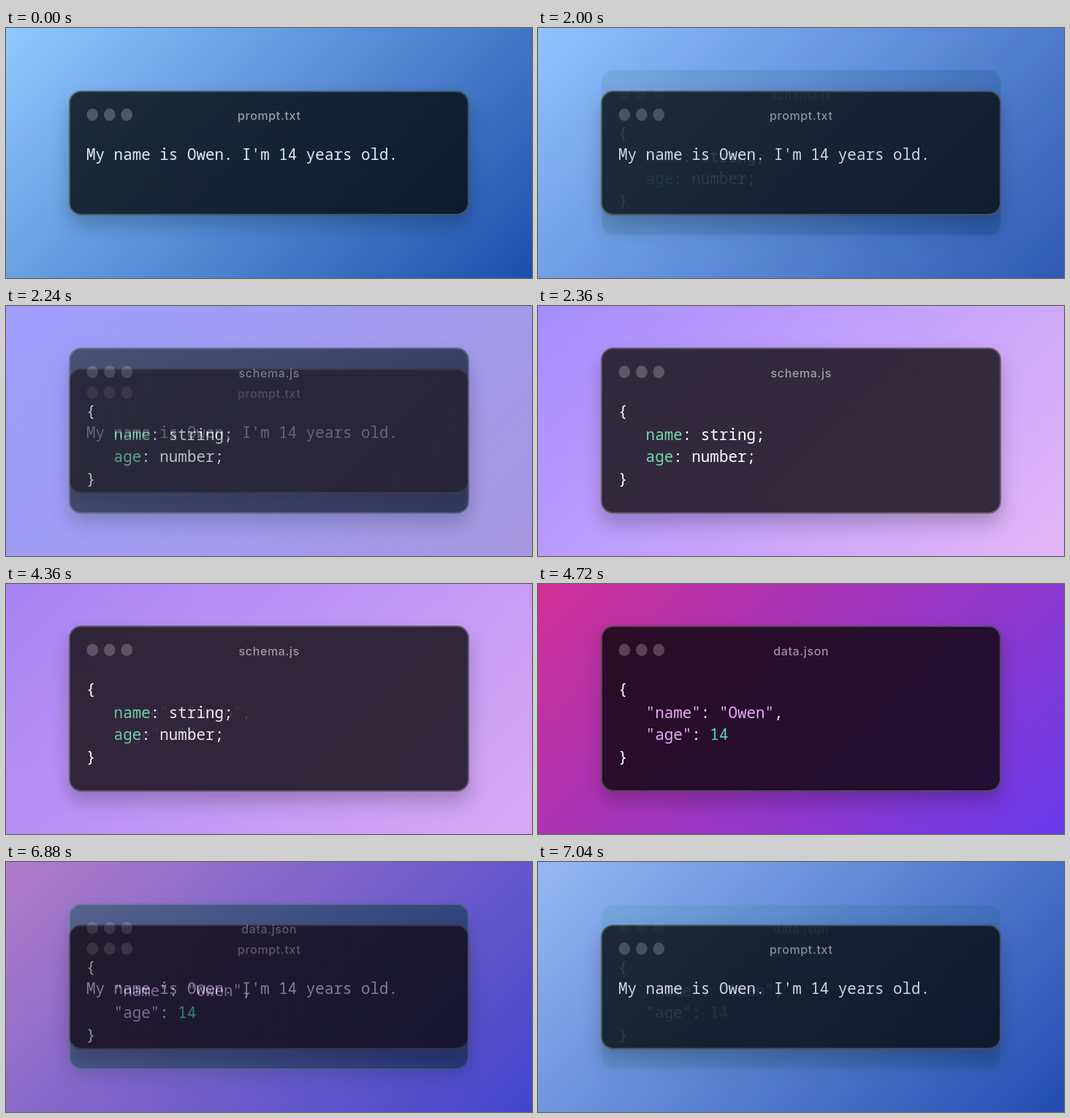
These frames come from a looping animation (720x343 px, 7080 ms). An HTML page:

```html
<!DOCTYPE html>
<html lang="en">
<head>
<meta charset="utf-8">
<title>Prompt to data</title>
<style>
  html, body { margin: 0; width: 100%; height: 100%; overflow: hidden; }
  body { position: relative; }

  .scene {
    position: absolute; left: 0; top: 0;
    width: 720px; height: 343px; overflow: hidden;
    background: linear-gradient(135deg, var(--bg));
  }
  .panel {
    position: absolute; left: 86px; top: 57px;
    box-sizing: border-box; width: 548px; height: 228px;
    border: 2px solid rgba(255, 255, 255, .24);
    border-radius: 17px;
    background: linear-gradient(135deg, var(--panel)) border-box;
    box-shadow: 0 14px 26px rgba(0, 0, 0, .22);
  }
  svg { position: absolute; left: 0; top: 0; }
  ellipse { fill: #fff; fill-opacity: .22; }
  text { white-space: pre; fill: var(--ink); }
  .title {
    font: 500 16px Inter, sans-serif; letter-spacing: .65px;
    text-anchor: middle; fill: #fff; fill-opacity: .55;
  }
  .code { font: 500 20.9px "Noto Sans Mono", "DejaVu Sans Mono", monospace; }
  .key { fill: var(--key); }
  .num { fill: #56dcb0; }

  .prompt {
    --bg: #90c9ff, #1b4fab; --panel: #1c2b39, #0c1c30; --ink: #dcecf8;
  }
  .prompt .panel { top: 86px; height: 171px; }
  .schema {
    --bg: #a58dff, #e3b6f7; --panel: #30283e, #362a3e; --ink: #fff; --key: #6fdca6;
    animation: schema 7080ms infinite;
  }
  .data {
    --bg: #d03096, #683bec; --panel: #2b0c27, #220f34; --ink: #fff; --key: #e9a8fb;
    animation: data 7080ms infinite;
  }

  /* Crossfades advance in 40 ms steps at 2000, 4360 and 6720 ms. */
  @keyframes schema {
    0% { opacity: 0; animation-timing-function: step-end; }
    28.245% { opacity: 0; animation-timing-function: steps(10, start); }
    33.895% { opacity: 1; animation-timing-function: step-end; }
    68% { opacity: 0; }
    100% { opacity: 0; }
  }
  @keyframes data {
    0% { opacity: 0; animation-timing-function: step-end; }
    61.578% { opacity: 0; animation-timing-function: steps(10, start); }
    67.228% { opacity: 1; animation-timing-function: step-end; }
    94.911% { opacity: 1; animation-timing-function: steps(9, start); }
    100% { opacity: .1; }
  }
</style>
</head>
<body>
<div class="scene prompt">
  <div class="panel"></div>
  <svg width="720" height="343">
    <g id="dots">
      <ellipse cx="118.3" cy="119" rx="7.8" ry="8.5"/>
      <ellipse cx="141.8" cy="119" rx="7.8" ry="8.5"/>
      <ellipse cx="165.3" cy="119" rx="7.8" ry="8.5"/>
    </g>
    <text class="title" x="360.3" y="126">prompt.txt</text>
    <text class="code" x="110" y="180.5">My name is Owen. I'm 14 years old.</text>
  </svg>
</div>

<div class="scene schema">
  <div class="panel"></div>
  <svg width="720" height="343">
    <use href="#dots" y="-28.5"/>
    <text class="title" x="360.3" y="97.5">schema.js</text>
    <g class="code">
      <text x="110" y="152">{</text>
      <text x="147.6" y="183.5"><tspan class="key">name</tspan>: string;</text>
      <text x="147.6" y="214"><tspan class="key">age</tspan>: number;</text>
      <text x="110" y="245">}</text>
    </g>
  </svg>
</div>

<div class="scene data">
  <div class="panel"></div>
  <svg width="720" height="343">
    <use href="#dots" y="-28.5"/>
    <text class="title" x="360.3" y="97.5">data.json</text>
    <g class="code">
      <text x="110" y="152">{</text>
      <text x="147.6" y="183.5"><tspan class="key">"name"</tspan>: <tspan class="key">"Owen"</tspan>,</text>
      <text x="147.6" y="214"><tspan class="key">"age"</tspan>: <tspan class="num">14</tspan></text>
      <text x="110" y="245">}</text>
    </g>
  </svg>
</div>
</body>
</html>
```
